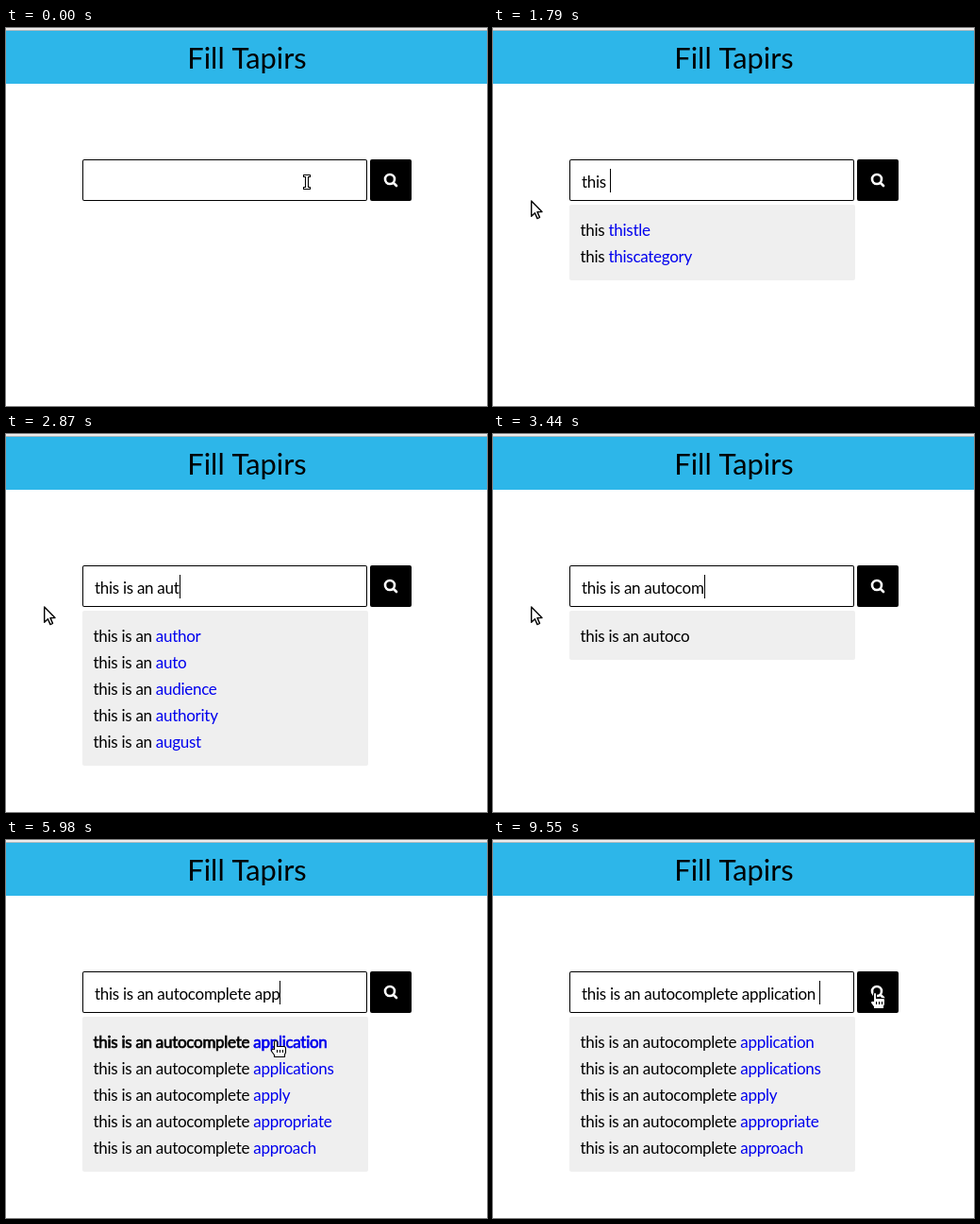
An HTML page with a canvas that plays this animation: 510 by 400 pixels, repeating every 9590 ms.

```html
<!DOCTYPE html>
<html lang="en">
<head>
<meta charset="utf-8">
<title>Autocomplete</title>
<style>
html, body { margin: 0; width: 100%; height: 100%; overflow: hidden; background: #fff; }
canvas { display: block; width: 510px; height: 400px; }
</style>
</head>
<body>
<canvas id="stage"></canvas>
<script>
const W = 510, H = 400, LOOP = 9590;
const FONT = 'Lato, "Open Sans", sans-serif';
const canvas = document.getElementById('stage');
const dpr = window.devicePixelRatio || 1;
canvas.width = W * dpr;
canvas.height = H * dpr;
const ctx = canvas.getContext('2d');

// Typing bursts: text and the time of each key.
const bursts = [
  ['thi', [1060, 1160, 1260]],
  ['s is an ', [1570, 1700, 1790, 1940, 2080, 2200, 2320, 2460]],
  ['autocom', [2560, 2690, 2820, 2950, 3100, 3260, 3440]],
  ['plete ', [3540, 3640, 3740, 3850, 3960, 4070]],
  ['app', [4220, 4370, 4510]]
];
// The third key of the second burst follows the pause after the first word.
bursts[1][1][2] = 1830;
const keys = bursts.flatMap(([text, times]) => times.map((at, i) => ({ at, ch: text[i] })));

// Time, typed words, completions of the last word.
const base = 'this is an ';
const full = base + 'autocomplete ';
const lists = [
  [1610, '', 'this thing things think third'],
  [1740, 'this ', 'thistle thiscategory'],
  [1900, 'this ', 'in is it into if'],
  [2020, 'this ', 'is island isolated issue issues'],
  [2280, 'this is ', 'and are at as all'],
  [2610, 'this is ', 'an and any another answer'],
  [2740, base, 'and are at as all'],
  [2870, base, 'author auto audience authority august'],
  [3000, base, 'author auto automatic authority automatically'],
  [3060, base, 'auto automatic automobile autonomous automatically'],
  [3170, base + 'autoc', ''],
  [3320, base + 'autoco', ''],
  [3590, base + 'autocom', ''],
  [3800, base + 'autocomple', ''],
  [4010, base + 'autocomplete', ''],
  [4290, full, 'and are at as all'],
  [4440, full, 'apart april apartment apple apology'],
  [4670, full, 'application applications apply appropriate approach']
].map(([at, head, words]) => ({ at, head, words: words.split(' ') }));

// Pointer moves: start, end, then a quadratic path.
const moves = [
  [150, 660, [319, 163], [190, 130], [40, 182]],
  [5260, 5960, [40, 182], [170, 208], [286, 212]],
  [6510, 6960, [286, 212], [350, 178], [405, 161]]
];

// Times at which the caret turns on or off.
const blinks = [400, 5260, 5980, 6220, 6260, 7300, 8050, 8800, 9550];

function pointerAt(t) {
  let pos = moves[0][2];
  for (const [from, to, a, b, c] of moves) {
    if (t < from) break;
    const p = Math.min(1, (t - from) / (to - from));
    const e = p * p * (3 - 2 * p);
    pos = a.map((v, i) => (1 - e) ** 2 * v + 2 * e * (1 - e) * b[i] + e * e * c[i]);
  }
  return pos.map(Math.round);
}

function setFont(size, spacing) {
  ctx.font = `${size}px ${FONT}`;
  ctx.letterSpacing = spacing + 'px';
}

function bar(x, y, w, h, fill) {
  ctx.fillStyle = fill;
  ctx.fillRect(x, y, w, h);
}

function box(x, y, w, h, r, fill) {
  ctx.fillStyle = fill;
  ctx.beginPath();
  ctx.roundRect(x, y, w, h, r);
  ctx.fill();
}

function write(text, x, y, color, bold) {
  ctx.fillStyle = ctx.strokeStyle = color;
  ctx.fillText(text, x, y);
  if (bold) {
    ctx.lineWidth = 0.7;
    ctx.strokeText(text, x, y);
  }
  return x + ctx.measureText(text).width;
}

const pointers = {
  arrow: 'M.7 1V17.2L4.4 13.7 7 19.6 9.5 18.4 7 12.6H12Z',
  beam: 'M-3.5 -7.5H3.5V-5.5H1.5V5.5H3.5V7.5H-3.5V5.5H-1.5V-5.5H-3.5Z',
  hand: 'M-1.5 2Q-1.5 .5 0 .5T1.5 2V6.5H8.5Q10.5 6.5 10.5 8.5V13L9.5 15V17.5H-1.5V15.5L-4.5 11.5Q-4.5 8.5 -1.5 9.5Z'
};

function drawPointer(x, y, kind) {
  const path = new Path2D(pointers[kind]);
  ctx.save();
  ctx.translate(x, y);
  ctx.lineJoin = 'round';
  ctx.lineWidth = kind === 'arrow' ? 1.4 : 1.1;
  ctx.fillStyle = '#fff';
  ctx.strokeStyle = '#000';
  ctx.fill(path);
  ctx.stroke(path);
  if (kind === 'hand') {
    for (const dx of [1, 4, 7]) bar(dx, 10, 1, 3, '#000');
  }
  ctx.restore();
}

function drawHeader() {
  bar(0, 0, W, 2, '#ececec');
  bar(0, 2, W, 1, '#b4bcc0');
  bar(0, 3, W, 56, '#2db6e9');
  setFont(30.8, 0);
  ctx.textAlign = 'center';
  write('Fill Tapirs', 255.5, 43, '#000');
  ctx.textAlign = 'left';
}

function drawButton() {
  box(386, 139, 44, 44, 2, '#000');
  ctx.strokeStyle = '#fff';
  ctx.lineWidth = 2.6;
  ctx.lineCap = 'round';
  ctx.beginPath();
  ctx.arc(407, 160, 5, 0, 7);
  ctx.moveTo(411, 164);
  ctx.lineTo(414, 167);
  ctx.stroke();
}

function drawField(t) {
  box(81, 139, 302, 44, 2, '#000');
  box(82, 140, 300, 42, 1, '#fff');
  const text = t >= 6220 ? full + 'application '
    : keys.filter(k => k.at <= t).map(k => k.ch).join('');
  const end = write(text, 94, 169, '#000');
  if (blinks.filter(b => b <= t).length % 2) bar(Math.round(end), 149, 1, 25, '#000');
}

function drawList(t, hover) {
  const list = lists.filter(l => l.at <= t).pop();
  if (!list) return;
  box(81, 187, 303, 24 + 28 * list.words.length, 2, '#efefef');
  list.words.forEach((word, i) => {
    const y = 219.5 + 28 * i, bold = i === hover;
    write(word, write(list.head, 92.5, y, '#000', bold), y, '#00e', bold);
  });
}

function draw(t) {
  const [x, y] = pointerAt(t);
  const inside = (l, top, r, b) => x >= l && x < r && y >= top && y < b;
  const onRow = inside(93, 199, 372, 227);
  const kind = inside(81, 139, 383, 183) ? 'beam'
    : onRow || inside(386, 139, 430, 183) ? 'hand' : 'arrow';

  ctx.setTransform(dpr, 0, 0, dpr, 0, 0);
  bar(0, 0, W, H, '#fff');
  drawHeader();
  setFont(17, -0.28);
  drawField(t);
  drawButton();
  drawList(t, onRow ? 0 : -1);
  drawPointer(x, y, kind);
}

const start = performance.now();
function tick() {
  draw((performance.now() - start) % LOOP);
  requestAnimationFrame(tick);
}
tick();
</script>
</body>
</html>
```
